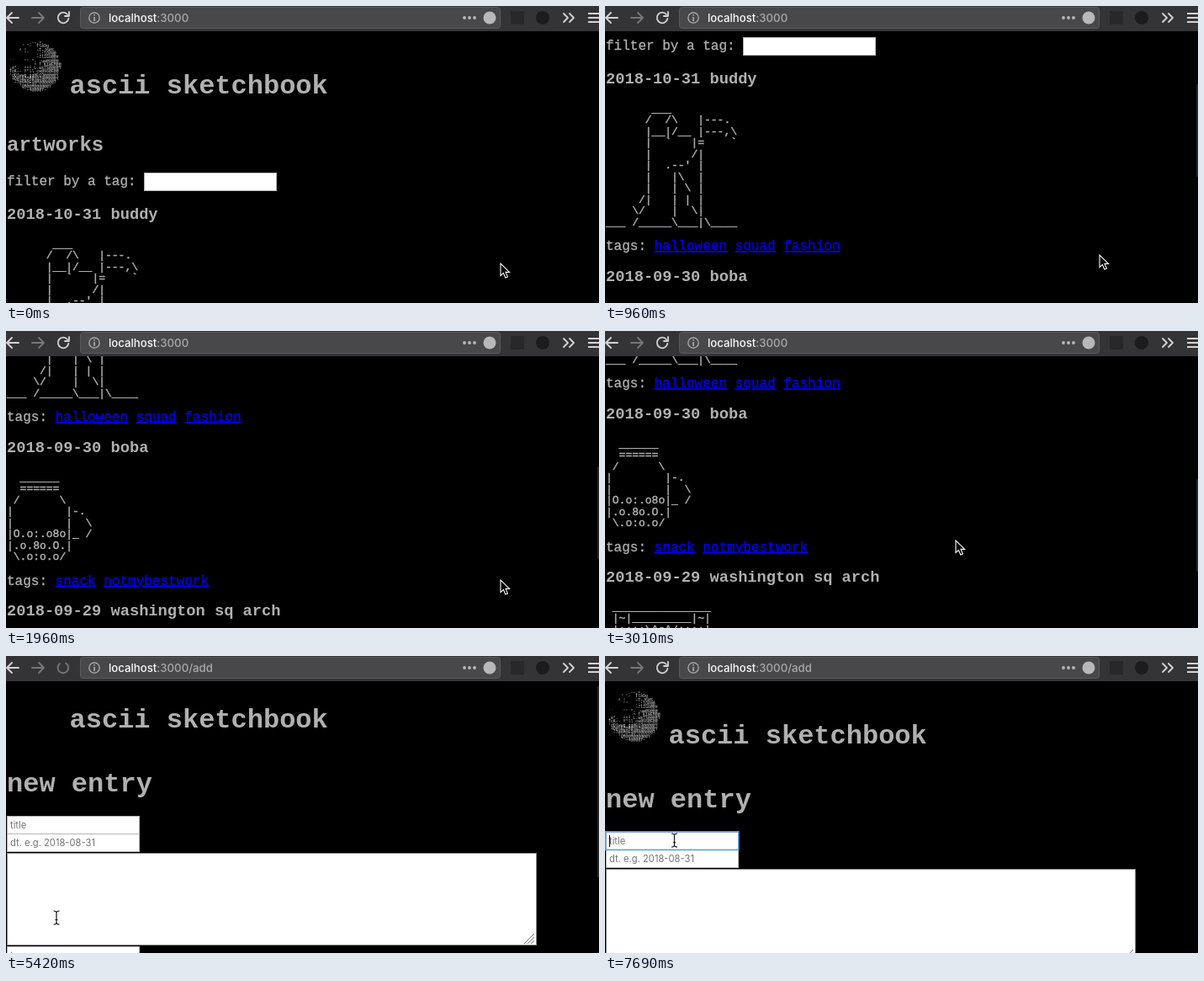
An HTML page that plays this animation: 705x353 px, repeating every 8 s.

```html
<!DOCTYPE html>
<html lang="en">
<head>
<meta charset="utf-8">
<title>ascii sketchbook</title>
<style>
  html, body { margin: 0; width: 100%; height: 100%; overflow: hidden; background: #000; }
  svg { display: block; width: 705px; height: 353px; }
  text { white-space: pre; font-family: "Liberation Mono", monospace; font-size: 16px; fill: #b0b0b0; stroke: #b0b0b0; stroke-width: .3; }
  .h1 { font-size: 32px; font-weight: bold; stroke: none; }
  .h2 { font-size: 24px; font-weight: bold; stroke: none; }
  .h3 { font-size: 18.72px; font-weight: bold; stroke: none; }
  .pre { font-size: 13px; stroke-width: .45; }
  .moon { font-size: 4.9px; fill: #d8d8d8; stroke: none; }
  .link { fill: #0000ee; stroke: #0000ee; text-decoration: underline 1px; text-underline-offset: 2.5px; }
  .seen { fill: #551a8b; stroke: #551a8b; }
  .ui { font-family: Inter, sans-serif; font-size: 13.2px; font-weight: 500; fill: #a9a9ac; stroke: none; }
  .hint { font-family: Inter, sans-serif; font-size: 11.2px; fill: #757575; stroke: none; }
  .icon { fill: none; stroke: #d4d4d7; stroke-width: 1.8; stroke-linecap: round; stroke-linejoin: round; }
  .dim { stroke: #77777a; }
  .flat { stroke-linecap: butt; stroke-width: 2; }
</style>
</head>
<body>
<svg id="stage" viewBox="0 0 705 353" xmlns="http://www.w3.org/2000/svg"></svg>
<script>
const LOOP = 8000;
const ROW = 13.5;

const buddy = [
  '       ___',
  '      /  /\\   |---.',
  '      |__|/__ |---,\\',
  '      |  `   |=    `',
  '      |      /|',
  "      |  .--' |",
  '      |   |\\  |',
  '      |   | \\ |',
  '     /|   | | |',
  '    \\/    |  \\|',
  '___ /_____\\___|\\____'
];
const boba = [
  '  ______',
  '  ======',
  ' /      \\',
  '|        |-.',
  '|        |  \\',
  '|O.o:.o8o|_ /',
  '|.o.8o.O.|',
  ' \\.o:o.o/'
];
const pillars = ' |  |       |  |';
const arch = [
  ' _______________',
  ' |~|_________|~|',
  ' |::::\\^o^/::::|',
  ' ---------------',
  ' |..|/     \\|..|',
  ' ---        ----',
  pillars, pillars, pillars,
  '.|__|.     .|__|.'
];
const moon = [
  '        .-~.=.',
  "     ' '-  Tlb9g",
  '    ^ !    ~T-J6@%.',
  "      ''   .-;lO#@@",
  '           ~7lIG0@@#',
  "``    '' *- -uw@0@@@",
  '        . ^ T KiWEM@@',
  '.e*.  ^^^ L.wkT%@@@@Y',
  'TcK~- Y*ll cw@%6@E@@',
  "'dQ1wwg_gg@EQ3@@@@@Y",
  ' 4Q@%BZOMB%BZ@@M@@@Y',
  '  ~7@6M@EQ@M@@@@@@7',
  "    'QM@@M@@@@@@Y",
  "      '~4@@@@Y~"
];

const text = (cls, x, y, s) => `<text class="${cls}" x="${x}" y="${y}">${s}</text>`;
const lines = (cls, x, y, step, rows) => rows.map((s, i) => text(cls, x, y + i * step, s)).join('');
const link = (s, cls = '') => `<tspan class="link ${cls}">${s}</tspan>`;
const icon = (d, cls = '') => `<path class="icon ${cls}" d="${d}"/>`;
const box = (x, y, w, h, fill, more = '') =>
  `<rect x="${x}" y="${y}" width="${w}" height="${h}" fill="${fill}" ${more}/>`;
const field = (x, y, w, h) => box(x + .5, y + .5, w - 1, h - 1, '#fff', 'stroke="#b4b4b4"');

// One sketch: heading, drawing and tags; y is the heading's baseline.
const entry = (y, title, art, tags) =>
  text('h3', 1, y, title) +
  lines('pre', 1, y + 34, ROW, art) +
  text('', 1, y + 63.5 + (art.length - 1) * ROW, 'tags: ' + tags.map(s => link(s)).join(' '));

const logo = lines('moon', 4, 45, 4.3, moon);
const title = text('h1', 75.5, 104, 'ascii sketchbook');

const home = logo + title +
  text('h2', 1, 172, 'artworks') +
  text('', 1, 213, 'filter by a tag:') + field(164, 198, 158, 22) +
  entry(252.6, '2018-10-31 buddy', buddy, ['halloween', 'squad', 'fashion']) +
  entry(487.6, '2018-09-30 boba', boba, ['snack', 'notmybestwork']) +
  entry(681.6, '2018-09-29 washington sq arch', arch, ['architecture', 'public']) +
  '<path d="M4.5 934.5H705" stroke="#ddd" stroke-width="3" stroke-linecap="round" stroke-dasharray="0 6"/>' +
  text('', 1, 950, link('home', 'seen') + ' ' + link('add'));

const form = `<g id="logo">${logo}</g>` + title +
  text('h1', 1, 180, 'new entry') +
  field(1, 209, 158, 22) + field(1, 230, 158, 22) + field(1, 364, 158, 22) +
  box(1.5, 253.5, 629, 109, '#fff', 'stroke="#8a8a8a"') +
  '<path d="M616 361L628 349M620 361L628 353M624 361L628 357" stroke="#777"/>' +
  text('hint', 5, 224, 'title') + text('hint', 5, 245, 'dt. e.g. 2018-08-31') +
  text('hint', 5, 379, 'tags, comma sep.') +
  box(.8, 208.8, 158, 21.6, 'none', 'id="focus" stroke="#5b9ee6" stroke-width="1.6"') +
  box(5, 213, 1, 14, '#000', 'id="caret"');

const toolbar = box(0, 0, 705, 30, '#343437') +
  box(88.5, 1.5, 499, 25, '#48484b', 'rx="3" stroke="#5a5a5d"') +
  icon('M15 14H1M7 8L1 14L7 20') + icon('M31 14H45M39 8L45 14L39 20', 'dim') +
  '<g id="reload">' + icon('M73 10A6.3 6.3 0 1 0 74.3 15') + icon('M75 7V12H70') + '</g>' +
  '<g id="busy">' + icon('M71 8.5A6.3 6.3 0 1 1 64 9', 'dim') + '</g>' +
  '<circle cx="105" cy="14" r="6.2" fill="none" stroke="#b4b4b7" stroke-width="1.2"/>' +
  '<path d="M105 13V18M105 10V11.5" stroke="#b4b4b7" stroke-width="1.5"/>' +
  text('ui', 122, 19, '<tspan fill="#f9f9fa">localhost</tspan>:3000<tspan id="path">/add</tspan>') +
  [545, 551, 557].map(x => `<circle cx="${x}" cy="14" r="1.9" fill="#b8b8bb"/>`).join('') +
  '<circle cx="575" cy="14" r="7.5" fill="#b8b8bb"/>' +
  box(600, 6, 16, 16, '#28282a') +
  '<circle cx="638" cy="14" r="8" fill="#1c1c1e"/>' +
  icon('M663 9L668 14L663 19M670 9L675 14L670 19') +
  icon('M692 9H705M692 14H705M692 19H705', 'flat');

const pointers =
  '<path id="arrow" d="M0 0V14.5L3.4 11.4L5.8 17L8.4 15.9L6 10.4H10.6Z" fill="#000" stroke="#fff" stroke-width="1.1"/>' +
  '<path id="hand" d="M-1.5 -6Q0 -8 1.5 -6V-1L6 0Q8 1 7.5 4L6 9H-2L-6 3Q-6 0 -3.5 1.5L-1.5 3Z" fill="#fff" stroke="#000"/>' +
  '<path id="beam" d="M-3.5 -8Q0 -8 0 -5.5Q0 -8 3.5 -8M0 -6V6M-3.5 8Q0 8 0 5.5Q0 8 3.5 8M-1.5 2.5H1.5" fill="none" stroke="#111" stroke-width="1.2"/>';

document.getElementById('stage').innerHTML = box(0, 0, 705, 353, '#000') +
  `<g id="home">${home}</g><g id="form">${form}</g>` +
  box(703, 0, 4, 110, '#242424', 'id="thumb" rx="1"') + toolbar + pointers;

const el = id => document.getElementById(id);
const show = (id, on) => { el(id).style.display = on ? '' : 'none'; };
const move = (id, x, y) => el(id).setAttribute('transform', `translate(${x} ${y})`);
const mix = (a, b, u) => a + (b - a) * u;
const ease = u => .5 - .5 * Math.cos(Math.PI * u ** 1.06);

// Progress 0..1 in n visible steps, the first at t0 and the last at t1.
function steps(t, t0, t1, n) {
  if (t < t0) return 0;
  if (t >= t1) return 1;
  return (Math.floor((t - t0) / (t1 - t0) * (n - 1)) + 1) / n;
}

function scrollAt(t) {
  return Math.round(161 * ease(steps(t, 60, 850, 14)) +
    223 * ease(steps(t, 1380, 2190, 15)) +
    252 * ease(steps(t, 3070, 3420, 7)));
}

function pointerAt(t) {
  if (t < 2670) return [588, mix(306, 296, steps(t, 910, 960, 2))];
  if (t < 4440) {
    const u = ease(steps(t, 2670, 2780, 3));
    return [mix(588, 417, u), mix(296, 249, u)];
  }
  if (t < 5840) {
    const u = steps(t, 4440, 5130, 12);
    if (u < .7) {
      const k = ease(u / .7);
      return [mix(417, 40, k), mix(249, 337, k)];
    }
    const k = ease((u - .7) / .3);
    return [mix(40, 60, k), mix(337, 311, k)];
  }
  const u = ease(steps(t, 5840, 6460, 10));
  return [mix(60, 82.5, u), mix(311, 219, u)];
}

function draw(t) {
  const adding = t >= 5360, loaded = t >= 5480, busy = t >= 5250 && !loaded;
  const scroll = scrollAt(t);
  show('home', !adding);
  show('form', adding);
  show('path', adding);
  show('logo', loaded);
  show('busy', busy);
  show('reload', !busy);
  move('home', 0, -scroll);
  move('form', 0, loaded ? 0 : -19);

  const thumb = el('thumb');
  thumb.setAttribute('y', adding ? 36 : 33 + scroll * .3726);
  thumb.setAttribute('height', adding ? 227 : 110);
  thumb.setAttribute('opacity', t < 60 || t >= 7100 ? 0 : t < 7050 ? 1 : .5);

  show('focus', t >= 6520);
  show('caret', t >= 6520 && (t < 7100 || t >= 7690));

  const kind = adding ? 'beam' : t >= 5070 ? 'hand' : 'arrow';
  for (const id of ['arrow', 'hand', 'beam']) show(id, id === kind);
  move(kind, ...pointerAt(t));
}

const start = performance.now();
function tick() {
  draw((performance.now() - start) % LOOP);
  requestAnimationFrame(tick);
}
tick();
</script>
</body>
</html>
```
